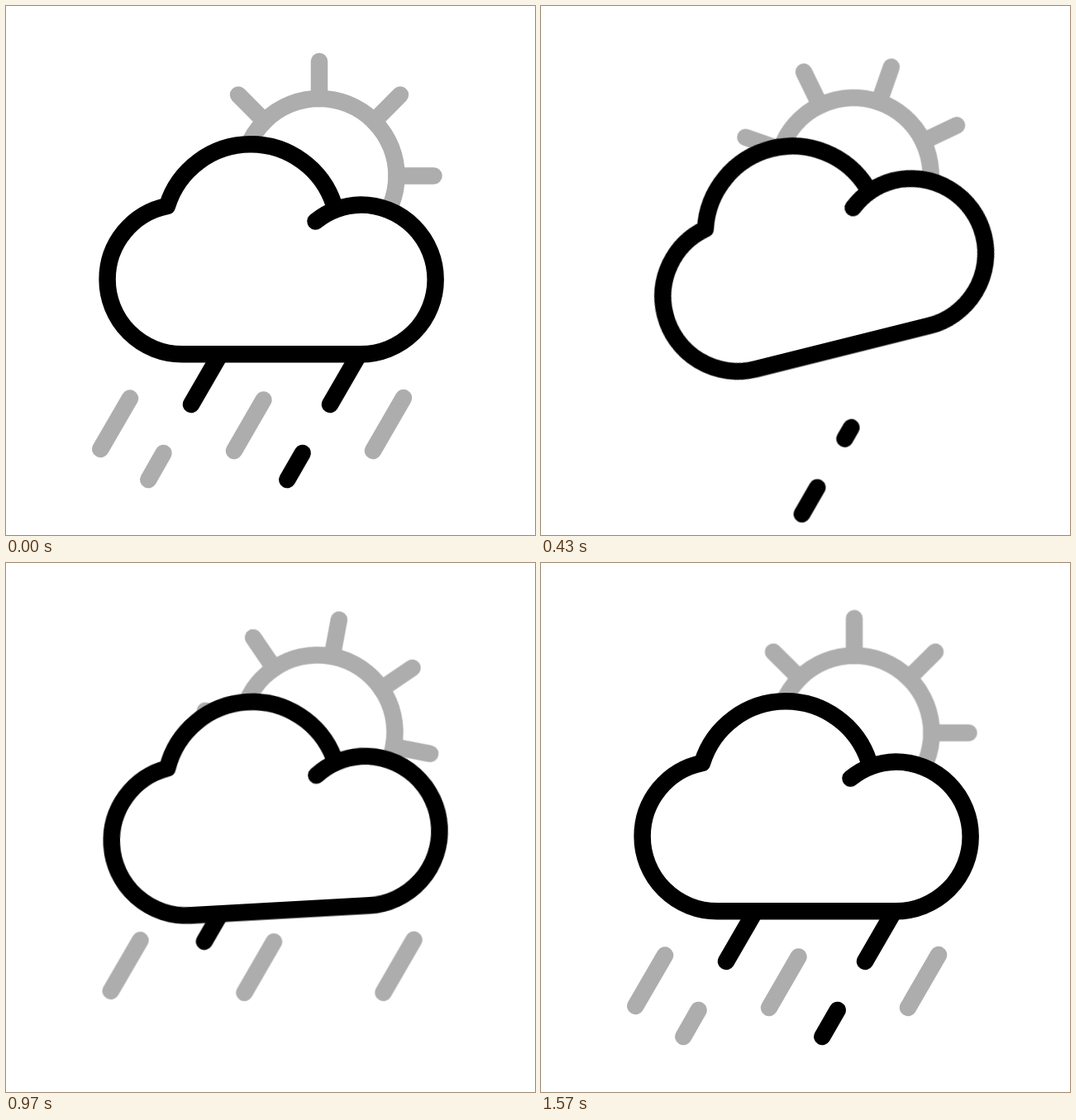
An HTML page without scripts that plays this animation: 640 by 640 pixels, repeating every 1.63 s.

```html
<!DOCTYPE html>
<html lang="en">
<head>
<meta charset="utf-8">
<title>Rain, cloud and sun</title>
<style>
  html, body { margin: 0; width: 100%; height: 100%; overflow: hidden; background: #fff; }
  svg { display: block; width: 100vw; height: 100vh; }
  svg * { animation: 1.63s linear infinite; }
  .line { fill: none; stroke-width: 20.5; stroke-linecap: round; stroke-linejoin: round; }
  .grey { stroke: #adadad; }
  .black { stroke: #000; }

  .sun { transform-origin: 379px 205.5px; animation-name: spin; }
  .cloud { fill: #fff; transform-origin: 309.5px 240px; animation-name: sway; }
  .rain { animation-name: fall; }
  /* offset 0 shows the drop, -1.1 hides it, -2.2 shows it again */
  .rain line { stroke-dasharray: 1 1.2; }

  @keyframes spin {
    0%, 5% { transform: none; animation-timing-function: ease-in; }
    16.56% { transform: translate(0, -.5px) rotate(-22.5deg); }
    26.38% { transform: translate(-.8px, -1px) rotate(-70.5deg); }
    36.81% { transform: translate(-1.6px, -1px) rotate(-113.7deg); }
    59.51% { transform: translate(-2px, -.7px) rotate(-214deg); }
    71.78% { transform: translate(-.8px, -.6px) rotate(-258deg); animation-timing-function: ease-out; }
    86%, 100% { transform: rotate(-270deg); }
  }
  @keyframes sway {
    0%, 6% { transform: none; animation-timing-function: ease-in; }
    16.56% { transform: rotate(-2.35deg); animation-timing-function: cubic-bezier(.3, .3, .6, 1); }
    25.5% { transform: rotate(-14.4deg); animation-timing-function: ease-in-out; }
    35.5% { transform: rotate(7deg); animation-timing-function: ease-in-out; }
    55% { transform: rotate(-4deg); animation-timing-function: ease-in-out; }
    71.8% { transform: rotate(1.35deg); animation-timing-function: ease-in-out; }
    92%, 100% { transform: none; }
  }
  @keyframes fall {
    0% { transform: none; animation-timing-function: cubic-bezier(.4, .2, .8, .7); }
    16.56% { transform: translate(-12px, 20.5px); }
    26.38% { transform: translate(-24.5px, 41.5px); }
    32.5% { transform: translate(-29px, 50px); animation-timing-function: step-end; }
    35% { transform: translate(31px, -47px); }
    36.81% { transform: translate(29px, -44px); }
    59.51% { transform: translate(12.5px, -18.3px); }
    71.78% { transform: translate(2.7px, -4px); animation-timing-function: ease-out; }
    94%, 100% { transform: none; }
  }

  #left { animation-name: left; }
  #middle { animation-name: middle; }
  #right { animation-name: right; }
  #long-a { animation-name: long-a; }
  #long-b { animation-name: long-b; }
  #short-a { animation-name: short-a; }
  #short-b { animation-name: short-b; }
  @keyframes left { 0%, 1% { stroke-dashoffset: 0 } 13%, 35.1% { stroke-dashoffset: -1.1 } 50%, 100% { stroke-dashoffset: -2.2 } }
  @keyframes middle { 0%, 2% { stroke-dashoffset: 0 } 14%, 40% { stroke-dashoffset: -1.1 } 54%, 100% { stroke-dashoffset: -2.2 } }
  @keyframes right { 0%, 13.5% { stroke-dashoffset: 0 } 25%, 44% { stroke-dashoffset: -1.1 } 58%, 100% { stroke-dashoffset: -2.2 } }
  @keyframes long-a { 0%, 16.6% { stroke-dashoffset: 0 } 25.5%, 50% { stroke-dashoffset: -1.1 } 60.5%, 100% { stroke-dashoffset: -2.2 } }
  @keyframes long-b { 0%, 17% { stroke-dashoffset: 0 } 30.4%, 58% { stroke-dashoffset: -1.1 } 70%, 100% { stroke-dashoffset: -2.2 } }
  @keyframes short-a { 0%, 16.6% { stroke-dashoffset: 0 } 25.5%, 61% { stroke-dashoffset: -1.1 } 71%, 100% { stroke-dashoffset: -2.2 } }
  @keyframes short-b { 0%, 27% { stroke-dashoffset: 0 } 34.9%, 65% { stroke-dashoffset: -1.1 } 75.4%, 100% { stroke-dashoffset: -2.2 } }
</style>
</head>
<body>
<svg viewBox="0 0 640 640">
  <defs>
    <path id="rays" d="M379 112V67M379 299V344M472.5 205.5H517.5M285.5 205.5H240.5"/>
  </defs>
  <g class="sun line grey">
    <circle cx="379" cy="205.5" r="93.5"/>
    <use href="#rays"/>
    <use href="#rays" transform="rotate(45 379 205.5)"/>
  </g>
  <g class="rain line grey">
    <line id="left" pathLength="1" x1="150" y1="474.5" x2="114.3" y2="536"/>
    <line id="middle" pathLength="1" x1="311.5" y1="476.5" x2="276" y2="538"/>
    <line id="right" pathLength="1" x1="481" y1="474" x2="444" y2="538"/>
    <line id="short-a" pathLength="1" x1="190.5" y1="541" x2="172.3" y2="573"/>
    <g class="black">
      <line id="long-a" pathLength="1" x1="259" y1="421.5" x2="224" y2="482"/>
      <line id="long-b" pathLength="1" x1="427" y1="421.5" x2="392" y2="482"/>
      <line id="short-b" pathLength="1" x1="358.7" y1="541" x2="340.3" y2="573"/>
    </g>
  </g>
  <path class="line black cloud" d="M374.5 260.5A90.4 90.4 0 0 1 429.3 240.5A90.4 90.4 0 0 1 429.3 421.3H213A90.4 90.4 0 0 1 122.6 331A90.4 90.4 0 0 1 195 242A105.8 105.8 0 0 1 396.9 241"/>
</svg>
</body>
</html>
```
